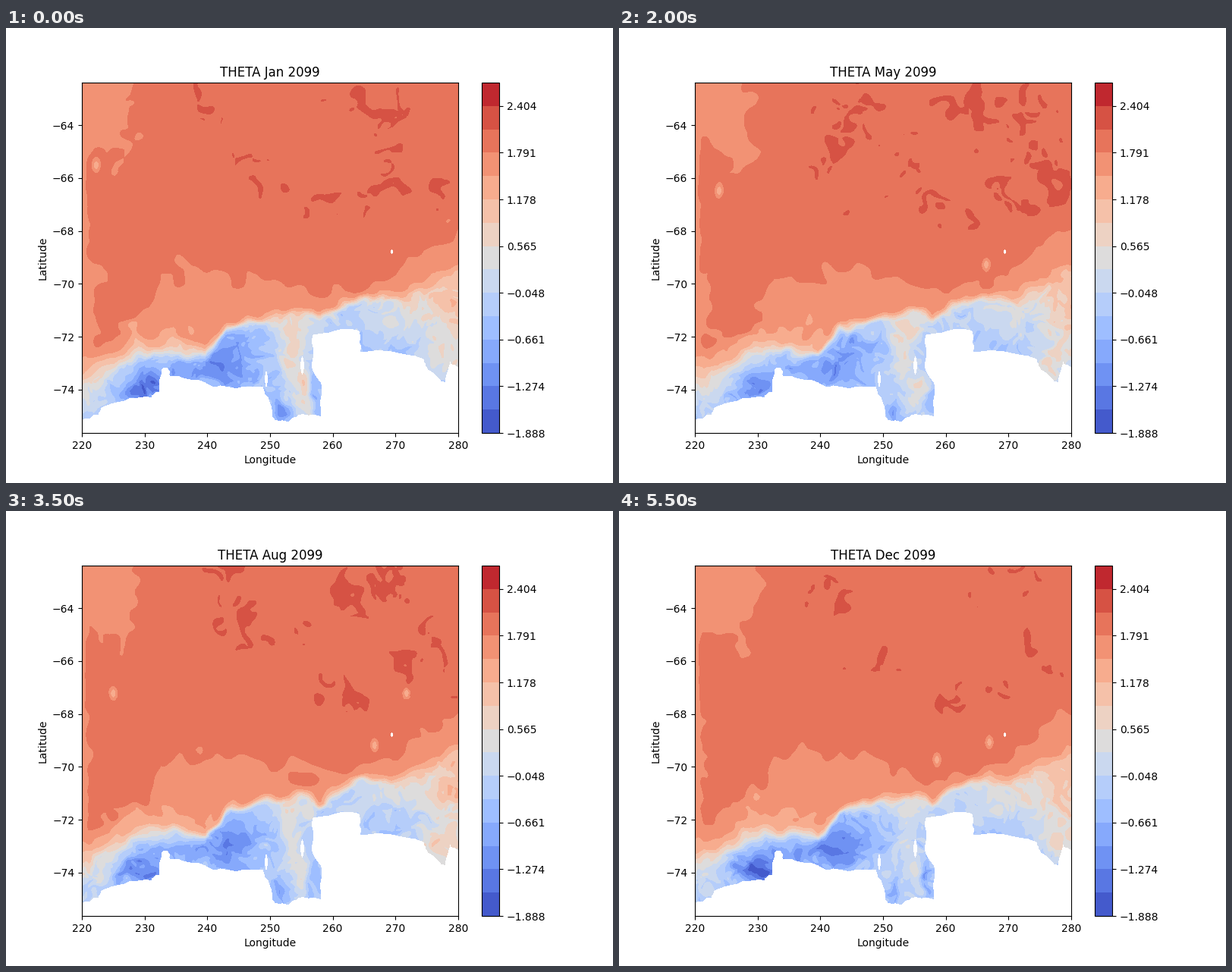
Write a matplotlib script that moves like this. It is 800 px wide and 600 px high and loops after 6 s.

```python
import numpy as np
import matplotlib.pyplot as plt
from matplotlib.animation import FuncAnimation
from matplotlib.colors import BoundaryNorm, ListedColormap

MONTHS = "Jan Feb Mar Apr May Jun Jul Aug Sep Oct Nov Dec".split()
LEVELS = -1.88755 + 0.30655 * np.arange(16)
COLORS = plt.get_cmap("coolwarm")((np.arange(15) + 0.5) / 15)
LEFT, RIGHT, TOP, BOTTOM = 100, 596, 72, 534
NORTH, SOUTH = -62.385, -75.645
NX, NY = 420, 390

# Key points in stage pixels
FRONT = [(100, 464), (145, 443), (175, 424), (220, 421), (262, 429), (290, 396), (340, 381),
         (405, 377), (413, 383), (440, 366), (465, 356), (525, 356), (596, 322)]
WARM_EDGE = [(100, 432), (150, 404), (188, 375), (204, 326), (270, 316),
             (430, 352), (500, 335), (596, 255)]
COAST = [(100, 518), (122, 510), (128, 500), (165, 488), (192, 488), (202, 480), (206, 450),
         (213, 449), (216, 459), (255, 465), (276, 474), (303, 476), (338, 473), (348, 496),
         (354, 517), (373, 519), (385, 511), (416, 513), (417, 472), (403, 446), (405, 405),
         (440, 398), (465, 400), (466, 428), (497, 426), (550, 437), (556, 451), (580, 468),
         (586, 440), (596, 448)]
ISLANDS = [(508.5, 295, 1.5, 3), (343, 463, 2, 10), (390.5, 445, 2.5, 12)]


def lon(x):
    return 220 + (x - LEFT) / (RIGHT - LEFT) * 60


def lat(y):
    return NORTH + (y - TOP) / (BOTTOM - TOP) * (SOUTH - NORTH)


X, Y = np.meshgrid(np.linspace(LEFT, RIGHT, NX), np.linspace(TOP, BOTTOM, NY))


def noise(scale, seed, month, shift=(0, 0)):
    """Smooth unit-variance noise, evolving by month, read at shifted grid places."""
    rng = np.random.default_rng(seed)
    size = 480
    spectrum = np.fft.fft2(rng.normal(size=(size, size)))
    k = np.fft.fftfreq(size)
    spectrum *= np.exp(-8 * scale ** 2 * (k[:, None] ** 2 + k ** 2))
    spectrum *= np.exp(1j * month * rng.normal(0, 0.6, spectrum.shape))
    field = np.fft.ifft2(spectrum).real
    field /= field.std()

    rows, cols = np.mgrid[:NY, :NX] + np.broadcast_to(np.reshape(shift, (2, 1, 1))
                                                      if np.ndim(shift) == 1 else shift, (2, NY, NX))
    i, j = np.floor(rows).astype(int), np.floor(cols).astype(int)
    fy, fx = rows - i, cols - j
    i, j, i1, j1 = i % size, j % size, (i + 1) % size, (j + 1) % size
    return ((1 - fy) * ((1 - fx) * field[i, j] + fx * field[i, j1])
            + fy * ((1 - fx) * field[i1, j] + fx * field[i1, j1]))


def season(month, peak):
    return np.cos(2 * np.pi * (month - peak) / 12)


def bumps(x, y, *parts):
    """Sum of Gaussian hills given as (x, y, half width, half height, amount)."""
    return sum(a * np.exp(-((x - cx) / rx) ** 2 - ((y - cy) / ry) ** 2)
               for cx, cy, rx, ry, a in parts)


def sigmoid(z):
    return 0.5 * (1 + np.tanh(z / 2))


def along(points):
    return np.interp(X, *zip(*points))


def eddies(month):
    """Cold cores that drift while they live: start, velocity, first and last month."""
    cores = [((119, 181), (3.2, 8.5), 0, 7), ((526, 240), (2, 0), 6, 7),
             ((484, 312), (0.6, -1), 4, 11), ((424, 328), (-2.5, 0), 9, 11)]
    return sum(bumps(X, Y, (x + vx * (month - first), y + vy * (month - first), 5, 8, 1))
               for (x, y), (vx, vy), first, last in cores if first <= month <= last)


def ocean(month, x, y, swirl, grain):
    eddying = (1 + 0.22 * season(month, 4)) * bumps(
        x, y, (285, 125, 60, 65, 1.0), (355, 180, 50, 40, 0.7), (480, 100, 80, 45, 1.0),
        (550, 200, 60, 48, 1.2), (445, 240, 60, 28, 1.1), (300, 235, 40, 14, 0.5))
    field = 1.94 + eddying * (0.08 + 0.13 * np.maximum(swirl, -0.6)) + 0.015 * grain

    corner = sigmoid((160 + 2.2 * month - x) / 8) * sigmoid((155 - y) / 9)
    edge = bumps(x, y, (95, 350, 24 + 7 * season(month, 1), 110, 1)) + np.exp(-((X - 100) / 6) ** 2)
    field -= 0.31 * np.tanh(1.2 * corner + edge + bumps(x, y, (158, 175, 16, 28, 0.6)))
    field -= 0.3 * sigmoid((y - along(WARM_EDGE)) / 5)
    field = np.maximum(field, 1.57 + 0.03 * grain)
    field -= (0.19 + 0.1 * grain) * bumps(x, y, (165, 402, 22, 18, 1), (240, 405, 45, 15, 1))
    return field - 0.75 * eddies(month)


def shelf(month, x, y):
    cold = 1 + 0.2 * season(month, 10)
    tongue = 0.95 - 0.045 * month
    return -0.25 + bumps(
        x, y, (110, 470, 35, 30, 0.45), (180, 476, 32, 20, -1.15 * cold),
        (225, 450, 60, 18, -0.5 * cold), (292, 438, 38, 40, -0.85 * cold),
        (362, 505, 12, 18, -0.9 * tongue), (385, 392, 35, 18, 0.6),
        (377, 430, 16, 45, tongue), (395, 482, 12, 28, tongue),
        (410, 480, 7, 28, -0.5 * cold), (505, 375, 45, 24, 0.45),
        (602, 360, 55, 60, 1.3), (575, 440, 26, 26, 0.75))


def theta(month):
    drift = np.array([noise(10, 1, month), noise(10, 2, month)])
    x, y = X + 8 * drift[0], Y + 8 * drift[1]
    swirl = noise(10, 3, month, 11 * drift)
    grain = noise(6, 4, month)
    streaks = noise(6, 5, month, 9 * drift)

    width = np.interp(X, [100, 150, 260, 290, 480, 540, 596], [10, 8, 4, 3, 3.5, 6, 6])
    offset = Y + 2.5 * noise(8, 6, month) - along(FRONT)
    coastal = shelf(month, X + 4 * drift[0], Y + 4 * drift[1]) + 0.13 * streaks
    open_sea = ocean(month, x, y, swirl, grain)
    field = coastal + (open_sea - coastal) * sigmoid(-offset / width)
    return np.clip(field, LEVELS[0] + 0.01, LEVELS[-2] - 0.01)


def jagged(points, rounds=2):
    """Roughen an outline by jittering the midpoint of every segment."""
    rng = np.random.default_rng(8)
    points = np.array(points, float)
    for _ in range(rounds):
        middle = (points[:-1] + points[1:]) / 2
        middle += rng.uniform(-2.2, 2.2, middle.shape)
        points = np.insert(points, np.arange(1, len(points)), middle, axis=0)
    return points


def land(points):
    x, y = np.array(points).T
    ax.fill(lon(x), lat(y), color="white", lw=0, zorder=1.5, antialiased=False)


fig, ax = plt.subplots(figsize=(8, 6), dpi=100)
bar = fig.colorbar(plt.cm.ScalarMappable(BoundaryNorm(LEVELS, 15), ListedColormap(COLORS)),
                   ax=ax, ticks=LEVELS[::2],
                   format=lambda v, _: f"{v:.3f}".replace("-", "\u2212"))
bar.minorticks_off()
land(list(jagged(COAST)) + [(RIGHT, BOTTOM), (LEFT, BOTTOM)])
for cx, cy, rx, ry in ISLANDS:
    land(jagged([(cx, cy - ry), (cx + rx, cy), (cx, cy + ry), (cx - rx, cy)], 0))
ax.set(xlim=(220, 280), ylim=(SOUTH, NORTH), xlabel="Longitude", ylabel="Latitude")
title = ax.set_title("")
shown = []


def draw(month):
    while shown:
        shown.pop().remove()
    shown.append(ax.contourf(lon(X), lat(Y), theta(month), levels=LEVELS, colors=COLORS))
    ax.set(xlim=(220, 280), ylim=(SOUTH, NORTH))
    title.set_text(f"THETA {MONTHS[month]} 2099")
    return shown + [title]


anim = FuncAnimation(fig, draw, frames=12, interval=500, repeat=True, repeat_delay=0)
plt.show()
```
